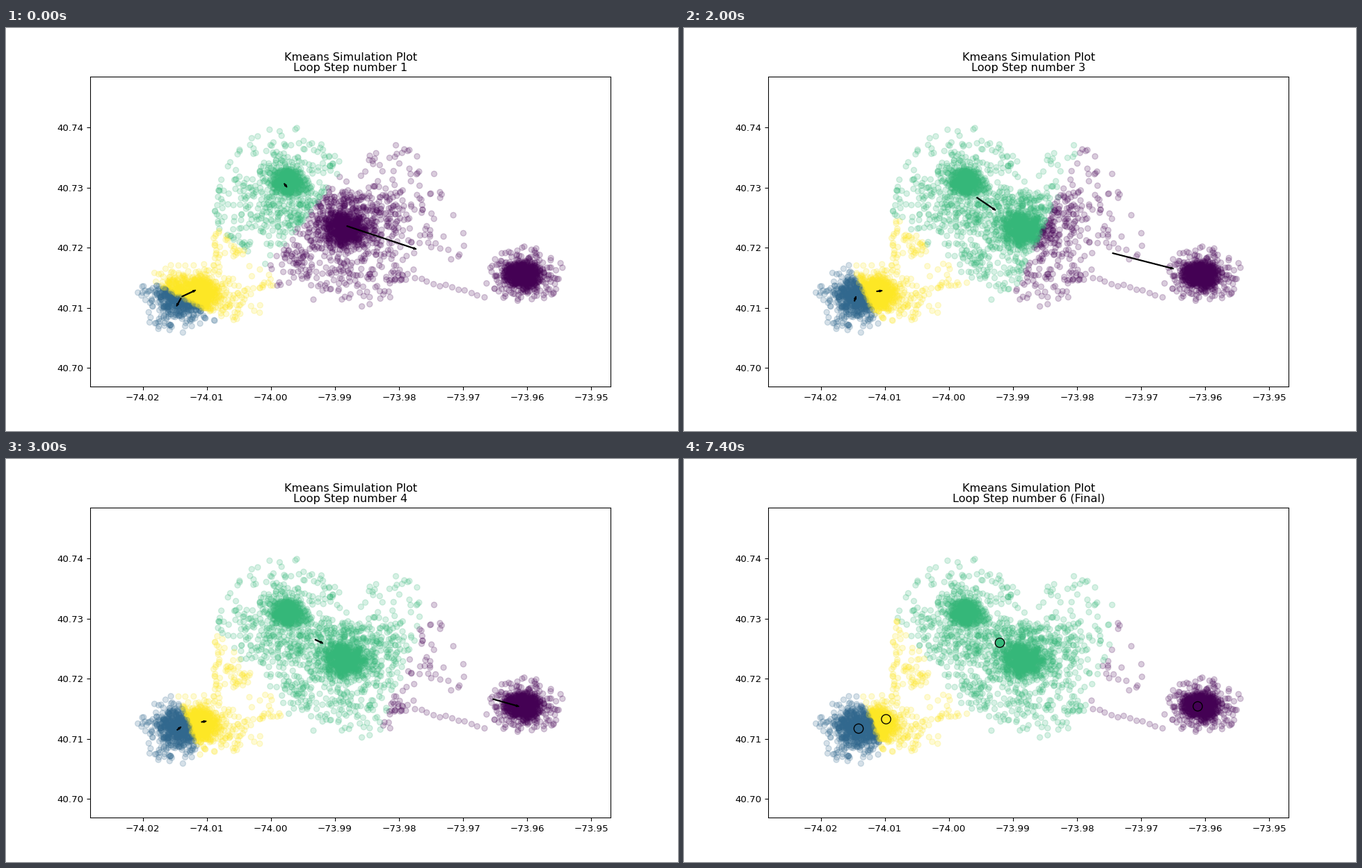
A matplotlib script for the animation above (9 s loop, 966x580 px).

```python
import numpy as np
import matplotlib.pyplot as plt
from matplotlib.animation import FuncAnimation

W, H, DPI = 966, 580, 96.6
rng = np.random.default_rng(12)


def to_geo(p):
    """Stage pixels to longitude and latitude."""
    p = np.asarray(p, float)
    return np.stack([-74.02 + (p[..., 0] - 196.5) / 9214,
                     40.74 - (p[..., 1] - 143) / 8662], axis=-1)


def polar(x, y, rx, ry, a):
    return np.column_stack([x + rx * np.cos(a), y + ry * np.sin(a)])


def blob(x, y, sx, sy, n, cut=2.2):
    """Gaussian cloud with its tail cut at `cut` deviations."""
    r = np.sqrt(-2 * np.log(1 - rng.random(n) * (1 - np.exp(-cut**2 / 2))))
    return polar(x, y, sx * r, sy * r, rng.uniform(0, 2 * np.pi, n))


def arc(x, y, inner, outer, start, end, n):
    """Sparse fringe in a ring sector; angles in degrees, clockwise."""
    r = rng.uniform(inner, outer, n)
    return polar(x, y, r, r, np.radians(rng.uniform(start, end, n)))


def trail(start, end, n, jitter):
    t = np.linspace(0, 1, n)[:, None]
    line = np.array(start) * (1 - t) + np.array(end) * t
    return line + rng.normal(0, jitter, (n, 2))


points = np.vstack([
    # south-west pair
    blob(248, 386, 14, 14, 400), blob(245, 390, 26, 23, 260),
    blob(283, 382, 11, 13, 360), blob(286, 383, 22, 21, 190),
    blob(320, 385, 25, 20, 30, 1.8),
    # north
    blob(406, 221, 12, 9, 340), blob(404, 224, 24, 21, 160),
    blob(392, 230, 46, 38, 190, 2), blob(425, 270, 28, 22, 110, 2),
    blob(352, 282, 25, 24, 40, 1.8), arc(402, 237, 65, 95, 180, 335, 38),
    # middle
    blob(488, 289, 14, 12, 430), blob(488, 288, 29, 25, 300),
    blob(500, 297, 52, 44, 330), blob(415, 335, 22, 22, 50, 1.8),
    blob(545, 265, 22, 24, 65, 2), blob(485, 372, 50, 19, 32, 1.8),
    arc(505, 310, 95, 155, -85, 10, 60),
    # east
    blob(743, 356, 13, 11, 440), blob(743, 355, 27, 18.5, 270),
    # connecting trails
    trail((577, 357), (687, 386), 13, 1), blob(562, 361, 9, 7, 14, 1.8),
    trail((310, 388), (397, 366), 20, 2.5),
    trail((305, 235), (301, 345), 34, 4), blob(328, 312, 14, 11, 28, 1.8),
    blob(372, 358, 18, 13, 10, 1.8), blob(345, 404, 22, 9, 10, 1.8),
])
rng.shuffle(points)
points = to_geo(points)

# centroid paths, one row per step: purple, blue, green, yellow
centers = to_geo([
    [(490, 285), (251.5, 389), (400, 224), (253, 386.5)],
    [(586, 317), (247, 397), (401.5, 226), (269, 379)],
    [(616, 324), (245, 393), (421, 244), (277, 379)],
    [(700, 345.5), (246, 390), (444.5, 260), (281, 378.5)],
    [(733.5, 355), (248.5, 388), (452, 263.5), (284, 378)],
    [(738.5, 356), (251, 388), (454, 264.5), (290.5, 374.5)],
])
LAST = len(centers) - 1

# the tiny margin keeps rounding from losing a pixel row
fig, ax = plt.subplots(figsize=((W + 1e-6) / DPI, (H + 1e-6) / DPI), dpi=DPI)
dots = ax.scatter(*points.T, c=np.zeros(len(points)), cmap="viridis",
                  vmin=0, vmax=3, alpha=0.2, linewidths=1)

marks = []
for start, end in zip(centers[:-1], centers[1:]):
    marks.append([ax.arrow(*a, *(b - a), width=0.0001, color="black")
                  for a, b in zip(start, end)])
marks.append([ax.scatter(*centers[LAST].T, c=range(4), cmap="viridis",
                         s=100, edgecolors="black", linewidths=1)])

low, high = to_geo([(120.75, 516.2), (869.4, 69.6)])
ax.set_xlim(low[0], high[0])
ax.set_ylim(low[1], high[1])
ax.set_xticks(np.arange(-7402, -7394) / 100)
ax.set_yticks(np.arange(4070, 4075) / 100)
ax.ticklabel_format(useOffset=False)
title = ax.set_title("", linespacing=1.03, pad=5.5)


def update(i):
    step = min(i, LAST)
    gap = points[:, None] - centers[step]
    dots.set_array((gap**2).sum(axis=2).argmin(axis=1))
    for k, group in enumerate(marks):
        for mark in group:
            mark.set_visible(k == step)
    ending = " (Final)" if step == LAST else ""
    title.set_text(f"Kmeans Simulation Plot\nLoop Step number {step + 1}{ending}")
    return [dots, title]


anim = FuncAnimation(fig, update, frames=9, interval=1000,
                     repeat=True, repeat_delay=0, blit=False)
plt.show()
```
